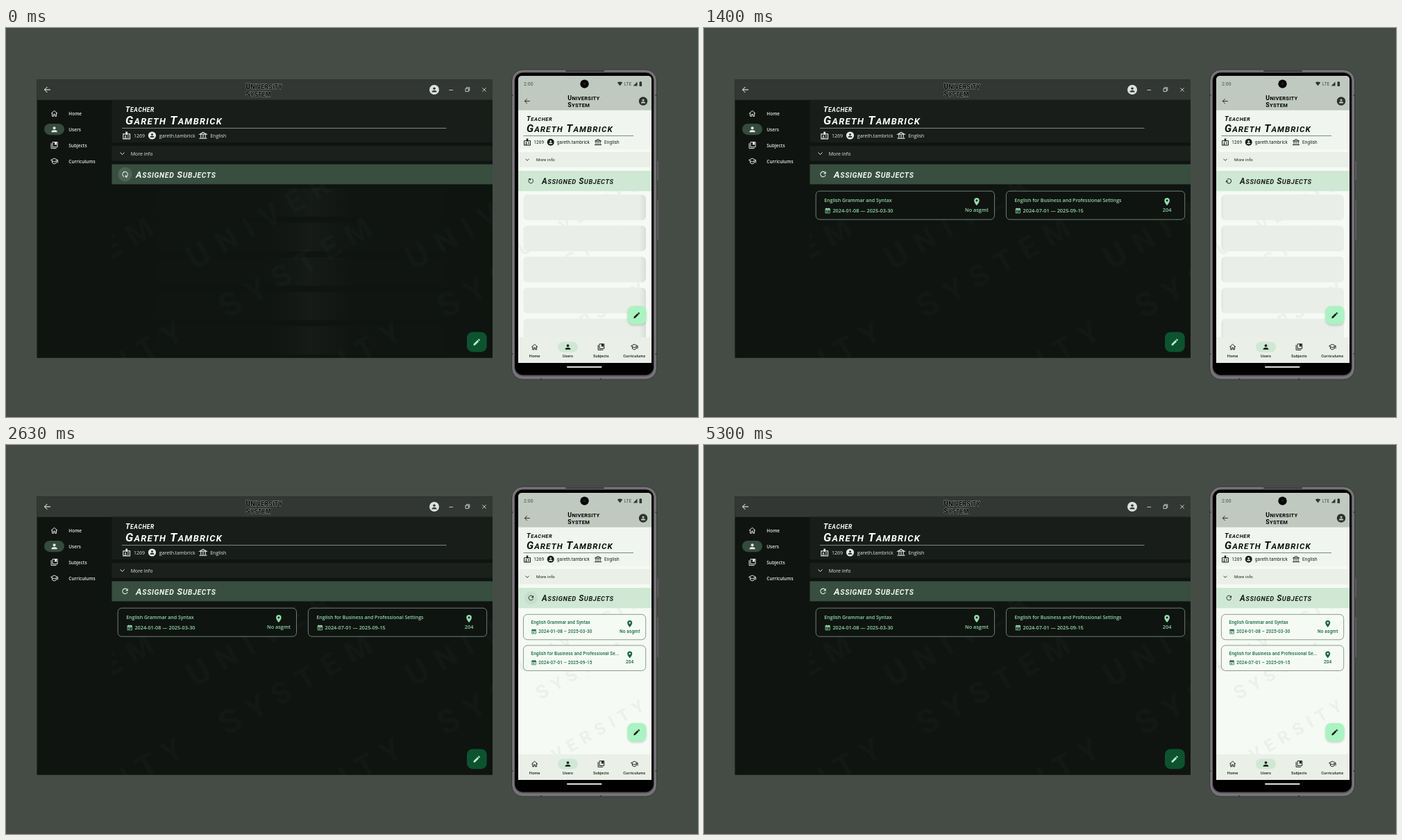
Animation, 997 px wide and 561 px high, one loop 5.33 s. Source, as an HTML page:

```html
<!DOCTYPE html>
<html lang="en">
<head>
<meta charset="utf-8">
<title>Teacher page</title>
<style>
html, body { margin: 0; width: 100%; height: 100%; overflow: hidden; background: #454c46; }
svg { display: block; width: 997px; height: 561px; }
text { white-space: pre; fill: currentColor; }
.desk { font: 7px "Open Sans", sans-serif; }
.phone { font: 6.4px Roboto, sans-serif; letter-spacing: .15px; }
.desk .bold { font-weight: 600; }
.phone .bold { font-weight: 500; }
.caps { font-family: Roboto, sans-serif; font-weight: 700; }
.slant { font-style: italic; }
.mid { text-anchor: middle; }
.icon { fill: currentColor; }
.icon .s { fill: none; stroke: currentColor; stroke-width: 2; }
</style>
</head>
<body>
<svg id="stage" viewBox="0 0 997 561"></svg>
<script>
const LOOP = 5330, SPIN = 0.21, SWEEP = 2.05;

const line = d => `<path class="s" d="${d}"/>`;
const solid = d => `<path fill-rule="evenodd" d="${d}"/>`;
const icons = {
  home: line('M3 12 12 4l9 8M6 10v10h4v-6h4v6h4V10'),
  person: '<circle cx="12" cy="8" r="4"/>' + solid('M4 20v-2c0-5 16-5 16 0v2z'),
  book: line('M3 6v15h15M7 3h14v14H7z') + solid('M13 3h6v9l-3-2-3 2z'),
  school: line('M2 9l10-5 10 5-10 5zM6 11v6l6 3 6-3v-6M22 9v8'),
  badge: line('M3 8h18v13H3zM14 13h4M14 17h4M6 18h6') + solid('M9.5 2h5v8h-5z') + '<circle cx="9" cy="14" r="2"/>',
  bank: line('M3 9 12 4l9 5zM6 10v8M12 10v8M18 10v8M2 20h20'),
  chevron: line('M6 9l6 6 6-6'),
  refresh: line('M17.3 6.7A7.2 7.2 0 1 0 19 14') + solid('M20 4v7h-7z'),
  pin: solid('M12 2a7 7 0 0 0-7 7c0 5 7 13 7 13s7-8 7-13a7 7 0 0 0-7-7zm0 4.5a2.5 2.5 0 1 1 0 5 2.5 2.5 0 1 1 0-5'),
  calendar: line('M4 5h16v16H4zM8 2v4M16 2v4M7 13h10M7 17h7') + solid('M4 5h16v5H4z'),
  pencil: solid('M3 17.2V21h3.8L17.8 9.9 14 6.2zM20.7 7a1 1 0 0 0 0-1.4l-2.3-2.3a1 1 0 0 0-1.4 0l-1.8 1.8 3.7 3.7z'),
  back: line('M21 12H4M12 4l-8 8 8 8'),
  wifi: solid('M12 21 1 7q11-8 22 0z'),
  signal: solid('M2 22 22 2v20z'),
  battery: solid('M7 4h3V2h4v2h3v18H7z')
};

const icon = (name, x, y, size, color = 'currentColor') =>
  `<g class="icon" color="${color}" transform="translate(${x} ${y}) scale(${size / 24}) translate(-12 -12)">${icons[name]}</g>`;
const rect = (x, y, w, h, fill, r = 0, extra = '') =>
  `<rect x="${x}" y="${y}" width="${w}" height="${h}" rx="${r}" fill="${fill}" ${extra}/>`;
const circle = (x, y, r, fill, extra = '') => `<circle cx="${x}" cy="${y}" r="${r}" fill="${fill}" ${extra}/>`;
const text = (x, y, s, cls = '', size = '') =>
  `<text x="${x}" y="${y}" class="${cls}" ${size && `style="font-size:${size}px"`}>${s}</text>`;
const group = (attrs, ...parts) => `<g ${attrs}>${parts.join('')}</g>`;

// Capitals with a larger first letter in every word.
const caps = (x, y, big, small, gap, s, cls = 'slant', extra = '') => {
  const spans = s.toUpperCase().split(' ').map(w => `${w[0]}<tspan font-size="${small}">${w.slice(1)}</tspan>`);
  return `<text x="${x}" y="${y}" class="caps ${cls}" style="font-size:${big}px;letter-spacing:${gap}px" ${extra}>${spans.join(' ')}</text>`;
};
const account = (x, y, r, color, bg) =>
  circle(x, y, r, color) + icon('person', x, y, r * 1.5, bg);
const backdrop = (x, y, scale, s) =>
  caps(0, 0, 48, 43, 15, s, '', `transform="translate(${x} ${y}) rotate(-30) scale(${scale})"`);

const nav = [['home', 'Home'], ['person', 'Users'], ['book', 'Subjects'], ['school', 'Curriculums']];
const subjects = [
  { name: 'English Grammar and Syntax', from: '2024-01-08', to: '2025-03-30', room: 'No asgmt' },
  { name: 'English for Business and Professional Settings', from: '2024-07-01', to: '2025-09-15', room: '204' }
];
const teacher = 'Gareth Tambrick', login = 'gareth.tambrick';

const skeleton = (id, x, y, w, h, step, r, base) => {
  const rows = fill => [0, 1, 2, 3, 4].map(i => rect(x, y + i * step, w, h, fill, r)).join('');
  return group(`id="${id}Wait"`, rows(base), rows(`url(#${id}Sweep)`));
};
const sweep = (id, color) =>
  `<linearGradient id="${id}Sweep" gradientUnits="userSpaceOnUse" y1="0" y2="0">` +
  [0, 1, 0].map((o, i) => `<stop offset="${i / 2}" stop-color="${color}" stop-opacity="${o}"/>`).join('') +
  '</linearGradient>';
const spinner = (id, x, y, size) =>
  `<g transform="translate(${x} ${y})"><g id="${id}Spin">${icon('refresh', 0, 0, size)}</g></g>`;

function desktop() {
  let words = '';
  for (let row = 0; row < 2; row++) for (let col = -2; col < 3; col++) {
    const x = 272 + 315 * col - 29 * row, y = 350 + 288 * row;
    words += backdrop(x, y, 1, 'University') + backdrop(x + 46, y + 70, 1, 'System');
  }
  const menu = nav.map(([name, label], i) => {
    const y = 123.3 + i * 22.9;
    return icon(name, 69.6, y, 12) + text(90.3, y + 2.6, label, 'bold', 6.5);
  }).join('');
  const cards = subjects.map((s, i) => {
    const x = 161.2 + i * 274.2;
    return rect(x, 235.2, 257.3, 41, '#0f1411', 5.5, 'stroke="#7f8981" stroke-width=".9"') +
      text(x + 12, 251.2, s.name, 'bold') +
      icon('calendar', x + 17, 263.3, 9.5) +
      text(x + 24.2, 266, `${s.from} — ${s.to}`, 'bold', 7.3) +
      icon('pin', x + 231.7, 250.5, 13) +
      text(x + 231.7, 265.2, s.room, 'bold mid', 7.3);
  }).join('');
  const titleInk = 'color="#000" stroke="#a4aca5" stroke-width=".8" paint-order="stroke"';

  return group('class="desk" color="#e5eae5"',
    rect(44.5, 74.5, 656.5, 401.3, '#0f1411'),
    group('clip-path="url(#deskBody)" color="#fff" opacity=".02"', words),
    rect(44.5, 74.5, 656.5, 29.3, '#323733'),
    icon('back', 59.5, 89, 12, '#fff'),
    caps(345.5, 88, 10, 8.3, .45, 'University', '', titleInk),
    caps(345.5, 99, 10, 8.3, .45, 'System', '', titleInk),
    account(617, 89, 7, '#dce2dc', '#323733'),
    '<path d="M638.5 89.5h5.5M662 87.2h4.4v4.4H662zM663.4 87v-1.2h4.4v4.4h-1.4M686.3 86.3l5.4 5.4m0-5.4l-5.4 5.4" fill="none" stroke="#d2d8d2" stroke-width=".9"/>',
    rect(55, 138, 29, 16.2, '#354b3b', 8.1), menu,
    rect(152.5, 103.8, 548.5, 61.4, '#181d1a'),
    caps(172, 120.5, 10.8, 8.5, .6, 'Teacher', 'slant', 'color="#fff"'),
    caps(172, 138.8, 17, 13, 1.25, teacher, 'slant', 'color="#fff"'),
    rect(167, 144, 467.5, .9, '#8b938c'),
    icon('badge', 173.7, 155, 13), text(184, 157.7, '1269'),
    account(210.5, 155, 5.6, '#e5eae5', '#181d1a'), text(220.8, 157.7, login),
    icon('bank', 284, 154.8, 13), text(294.2, 157.7, 'English'),
    rect(152.5, 170, 548.5, 21.7, '#1b201d'),
    icon('chevron', 167.5, 181, 12), text(179.8, 183.5, 'More info'),
    rect(152.5, 196.5, 548.5, 28.9, '#384e3f'),
    circle(171.5, 211, 10.3, '#d0e8d5', 'id="deskHalo"'),
    spinner('desk', 171.5, 211, 12.5),
    caps(187, 215.8, 13.2, 10.4, .65, 'Assigned Subjects', 'slant', 'color="#eef6ee"'),
    group('clip-path="url(#deskBody)"', skeleton('desk', 219, 230.8, 415.5, 41.3, 49.8, 5.5, '#1b201d')),
    group('id="deskCards" color="#94dba9"', cards),
    rect(664, 438.4, 28.7, 28.8, '#0d5330', 8),
    icon('pencil', 678.3, 453, 12.5, '#b4f5c8'));
}

function phone() {
  const menu = nav.map(([name, label], i) => {
    const x = 761.6 + i * 47.9;
    return icon(name, x, 460, 11.5) + text(x, 474.8, label, 'bold mid', 5.6);
  }).join('');
  const cards = subjects.map((s, i) => {
    const y = 244.3 + i * 44.7;
    const name = s.name.length > 40 ? s.name.slice(0, 40) + '...' : s.name;
    return rect(745.4, y, 176.3, 36.5, '#f5fbf4', 6, 'stroke="#757e76" stroke-width=".8"') +
      text(756.5, y + 14, name, 'bold', 6.3) +
      icon('calendar', 760.6, y + 24.6, 8.6) +
      text(767.2, y + 26.9, `${s.from} – ${s.to}`, 'bold', 6.4) +
      icon('pin', 898.7, y + 13.6, 12) +
      text(898.7, y + 26.4, s.room, 'bold mid', 6.5);
  }).join('');

  return group('class="phone" color="#171d19"',
    rect(937, 192, 3, 28, '#5f5d60', 1), rect(937, 248, 3, 58, '#5f5d60', 1),
    rect(728.6, 60, 209, 447, '#747276', 16, 'stroke="#363537" stroke-width="1"'),
    rect(731.4, 62.8, 203.4, 440.4, '#59575b', 13.5, 'stroke="#8a888c" stroke-width=".8"'),
    rect(733.2, 64.4, 199.8, 436, '#000', 11.5),
    rect(806, 61.2, 56, 1.5, '#2a292b', .7),
    '<path d="M728 97h2.5M728 470h2.5M935.5 97h2.5M935.5 470h2.5M771 505v2.5M857 505v2.5" stroke="#363537" stroke-width="1.5"/>',
    group('clip-path="url(#screen)"',
      rect(738, 69, 192, 414, '#f5fbf4'),
      group('color="#ebf1ea"',
        backdrop(744, 329, .57, 'University'), backdrop(770, 368, .57, 'System'), backdrop(733, 490, .57, 'University')),
      rect(738, 69, 192, 49.8, '#bfc9c0'),
      group('color="#49514b"', text(746, 83, '2:00', '', 6.8), icon('wifi', 884.5, 80.5, 8, '#2d352f'),
        text(890.7, 83, 'LTE', '', 6.4), icon('signal', 906.6, 80.5, 7, '#2d352f'), icon('battery', 914.3, 80.5, 8.5, '#2d352f')),
      circle(833.5, 80.6, 6.2, '#050505'), circle(833.5, 80.6, 2, '#16191c'),
      icon('back', 750.8, 105.5, 10.5),
      group('color="#000"', caps(809.3, 104.2, 8.8, 7.5, .3, 'University', ''), caps(809.3, 114.4, 8.8, 7.5, .3, 'System', '')),
      account(918, 105.5, 6.2, '#2a322c', '#bfc9c0'),
      rect(738, 118.8, 192, 56, '#f0f6ef'),
      group('color="#0a0d0b"', caps(750, 133.6, 9.6, 7.5, .55, 'Teacher'), caps(750, 150.2, 15.2, 11.6, 1.1, teacher)),
      rect(745.5, 155, 158.5, .9, '#737b74'),
      icon('badge', 751, 164.6, 12), text(760.2, 167, '1269'),
      account(784.7, 164.7, 5, '#171d19', '#f0f6ef'), text(793.8, 167, login),
      icon('bank', 853, 164.5, 12), text(862, 167, 'English'),
      rect(738, 179, 192, 21.8, '#eaf0e8'),
      icon('chevron', 751, 190, 10), text(764, 192.2, 'More info', '', 6),
      rect(738, 206, 192, 29.3, '#cfe8d4'),
      circle(756.3, 220.6, 9.5, '#384e3f', 'id="phoneHalo"'),
      spinner('phone', 756.3, 220.6, 11),
      caps(772, 225, 11.8, 9.3, .6, 'Assigned Subjects'),
      skeleton('phone', 745.3, 240.2, 176.7, 37, 44.75, 6, '#e9eee8'),
      group('id="phoneCards" color="#17683f"', cards),
      rect(895.4, 402.2, 27, 27, '#0c1a10', 8, 'opacity=".18" filter="url(#soft)"'),
      rect(895.4, 401, 27, 26.4, '#abf3c2', 8),
      icon('pencil', 908.8, 414.3, 11.5, '#06130a'),
      rect(738, 446, 192, 37, '#eaefe8'),
      rect(795, 452.5, 29, 15, '#cfe8d4', 7.5), menu),
    rect(808, 488, 50.5, 1.7, '#fff', .85));
}

const stage = document.getElementById('stage');
stage.innerHTML = `<defs>
  <clipPath id="deskBody">${rect(152.5, 225.4, 548.5, 250.4, '#000')}</clipPath>
  <clipPath id="screen"><path d="M738 483V75q0-6 6-6h180q6 0 6 6v408z"/></clipPath>
  <filter id="soft" x="-50%" y="-50%" width="200%" height="200%"><feGaussianBlur stdDeviation="1.8"/></filter>
  ${sweep('desk', '#4a524c')}${sweep('phone', '#b8bfb8')}</defs>` +
  rect(0, 0, 997, 561, '#454c46') + desktop() + phone();

const ramp = (t, from, to) => Math.min(1, Math.max(0, (t - from) / (to - from)));
const mod = (v, n) => ((v % n) + n) % n;
const el = id => document.getElementById(id);
const fade = (id, v) => el(id).setAttribute('opacity', v.toFixed(3));

const loaders = [
  { id: 'desk', x: 219, w: 415.5, angle: 95, stop: 360, phase: .53, swap: 1160,
    halo: t => .14 * (1 - ramp(t, 60, 320)), shown: t => .12 + .88 * ramp(t, 0, 260) },
  { id: 'phone', x: 745.3, w: 176.7, angle: 270, stop: 720, phase: 1.1, swap: 2143,
    halo: t => .06 * ramp(t, 2150, 2350) * (1 - ramp(t, 3200, 3500)), shown: () => 1 }
];

function draw(t) {
  for (const p of loaders) {
    const done = ramp(t, p.swap, p.swap + 220);
    fade(p.id + 'Wait', p.shown(t) * (1 - done));
    fade(p.id + 'Cards', done);
    fade(p.id + 'Halo', p.halo(t));
    el(p.id + 'Spin').setAttribute('transform', `rotate(${Math.min(p.angle + SPIN * t, p.stop)})`);
    const at = mod(p.phase + .5 + SWEEP * t / 1000, SWEEP) - .5;
    const band = el(p.id + 'Sweep');
    band.setAttribute('x1', p.x + (at - .155) * p.w);
    band.setAttribute('x2', p.x + (at + .155) * p.w);
  }
}

const start = performance.now();
(function tick() {
  draw((performance.now() - start) % LOOP);
  requestAnimationFrame(tick);
})();
</script>
</body>
</html>
```
